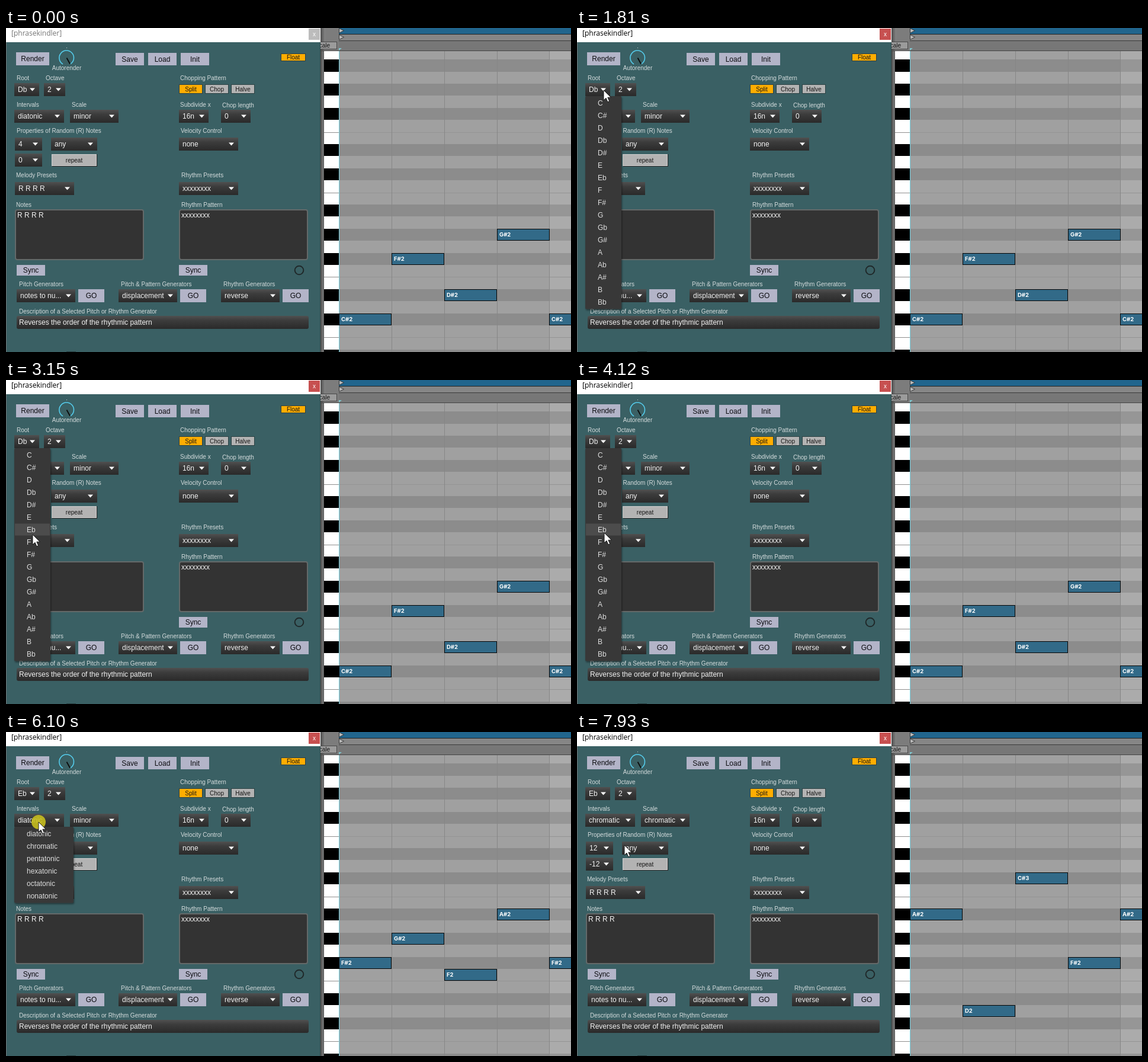
Recreate the animation shown at these times as an HTML page. Size 954 by 547 pixels, loop 8 s.

```html
<!DOCTYPE html>
<html lang="en">
<head>
<meta charset="utf-8">
<title>Melody tool</title>
<style>
  html, body { margin: 0; width: 100%; height: 100%; overflow: hidden; background: #3a6064; }
  svg { display: block; width: 954px; height: 547px; }
  text { font: 12px "Liberation Sans", Arial, sans-serif; fill: #f2f2f2; }
  .label { font-size: 10px; fill: #d5dcdd; }
  .dark { fill: #0c0c10; }
  .small { font-size: 10px; fill: #141414; }
  .note { font: 700 9.5px Inter, "Liberation Sans", sans-serif; fill: #fff; }
  .title { font: 12px "Open Sans", "Noto Sans", sans-serif; }
  .item { fill: #dedede; }
</style>
</head>
<body>
<svg id="stage" viewBox="0 0 954 547" xmlns="http://www.w3.org/2000/svg">
  <defs>
    <linearGradient id="drop" x2="0" y2="1">
      <stop offset="0" stop-color="#505050"/><stop offset=".35" stop-color="#3c3c3c"/><stop offset="1" stop-color="#2a2a2a"/>
    </linearGradient>
    <linearGradient id="edge">
      <stop offset="0" stop-color="#4c4c4c"/><stop offset="1" stop-color="#858585"/>
    </linearGradient>
    <filter id="shade" x="-10%" y="-5%" width="125%" height="115%">
      <feDropShadow dx="1" dy="2" stdDeviation="1.5" flood-opacity=".45"/>
    </filter>
  </defs>
</svg>
<script>
const LOOP = 8000;
const stage = document.getElementById("stage");

function add(tag, attrs, parent = stage) {
  const el = document.createElementNS("http://www.w3.org/2000/svg", tag);
  for (const k in attrs) el.setAttribute(k, attrs[k]);
  return parent.appendChild(el);
}
const box = (x, y, w, h, fill, parent, more) =>
  add("rect", { x, y, width: w, height: h, fill, ...more }, parent);
function write(x, y, str, cls = "", parent, anchor = "start") {
  const el = add("text", { x, y, class: cls, "text-anchor": anchor }, parent);
  el.textContent = str;
  return el;
}
const show = (el, on) => el.setAttribute("visibility", on ? "visible" : "hidden");
function setText(el, str) { if (el.textContent !== str) el.textContent = str; }

// ---- piano roll ----
const NAMES = ["C", "C#", "D", "D#", "E", "F", "F#", "G", "G#", "A", "A#", "B"];
const BEATS = [562, 651, 740, 829, 917];
const rowTop = p => Math.round(481.6 - 20.4 * (p - 1));
const mod12 = p => (p + 12) % 12;

box(531, 0, 423, 547, "#858585");
for (let p = -2; p <= 23; p++) {
  const y = rowTop(p), h = rowTop(p - 1) - y, name = NAMES[mod12(p)], black = name.length > 1;
  box(562, y, 355, h, black ? "#8c8c8c" : "#a0a0a0");
  box(917, y, 37, h, black ? "#969696" : "#ababab");
  box(537, y, 25, h, black ? "#000" : "#fff");
  if (name === "E" || name === "B") {
    box(537, y, 25, 1, "#8f8f8f");
    box(562, y, 392, 1, "#949494");
  }
}
BEATS.slice(1).forEach(x => box(x, 39, 1, 508, "#868686"));
box(531, 39, 6, 508, "url(#edge)");
box(536, 39, 1, 508, "#555");
box(531, 0, 31, 39, "#7c7c7c");
box(531, 0, 8, 39, "url(#edge)");
box(562, 0, 392, 10, "#21658d");
box(562, 10, 392, 1, "#222");
box(562, 11, 392, 10, "#868686");
box(562, 21, 392, 1, "#3a3a3a");
box(562, 22, 392, 16, "#777");
box(531, 38, 423, 1, "#444");
box(520.5, 23.5, 38, 12, "#9b9b9b", stage, { stroke: "#484848" });
write(522, 33, "Scale", "small");
for (const y of [0, 11])
  add("path", { d: `M562.5 ${y + .5}L570.5 ${y + 4.5}L562.5 ${y + 8.5}Z`, fill: "#b9b9b9", stroke: "#222", "stroke-width": .8 });
add("path", { d: "M562 34h5l-5 4z", fill: "#7fc9d2" });
box(562, 39, 1, 508, "#76d3e4");

const tunes = [[1, 6, 3, 8, 1], [6, 8, 5, 10, 6], [10, 2, 13, 6, 10]].map(tune => {
  const g = add("g", {});
  tune.forEach((p, i) => {
    const x = BEATS[i], y = rowTop(p);
    box(x + .5, y + .5, 88, 19, "#326a88", g, { stroke: "#050505" });
    write(x + 4, y + 13.3, NAMES[p % 12] + (p < 12 ? 2 : 3), "note", g);
  });
  return g;
});

// ---- window ----
box(0, 0, 531, 547, "#3a6064");
box(0, 24, 1, 523, "#6c7577");
box(530, 24, 1, 523, "#2e4a4d");
box(0, 0, 531, 24, "#fff");
box(102, 546, 16, 1, "#263c3e");
const title = write(9, 13, "[phrasekindler]", "title");
const closeBox = box(511, 1, 19, 19, "#bcbcbc");
write(520.5, 14, "x", "label", stage, "middle").style.fill = "#fff";

function button(x, y, w, h, str) {
  box(x, y, w, h, "#b3b4c8");
  write(x + w / 2, y + h / 2 + 4.4, str, "dark", stage, "middle");
}
button(17, 41, 56, 22, "Render");
[["Save", 185], ["Load", 240], ["Init", 295]].forEach(([s, x]) => button(x, 42, 48, 21, s));
[18, 292].forEach(x => button(x, 400, 48, 18, "Sync"));
[122, 294, 467].forEach(x => button(x, 441, 44, 22, "GO"));

function toggle(x, y, w, h, str, fill) {
  box(x + .5, y + .5, w - 1, h - 1, fill, stage, { stroke: "#2d4143" });
  write(x + w / 2, y + h / 2 + 3.5, str, "small", stage, "middle");
}
toggle(464, 43, 42, 13, "Float", "#ffad00");
toggle(292, 95, 40, 16, "Split", "#ffad00");
toggle(336, 95, 40, 16, "Chop", "#b3b3b3");
toggle(380, 95, 40, 16, "Halve", "#b3b3b3");
box(78, 213, 76, 21, "#222");
box(77.5, 213.5, 75, 19, "#b3b3b3", stage, { stroke: "#d0d0d0" });
write(115, 226.5, "repeat", "small", stage, "middle");

// dial
add("path", { d: "M96 61A12.3 12.3 0 1 1 109 60.6", fill: "none", stroke: "#55cdec", "stroke-width": 1.6 });
add("path", { d: "M102.5 50.5L108 60.5", stroke: "#0c0c0c", "stroke-width": 1.8 });
box(102, 33, 1, 1, "#cfd8d9");
write(102.5, 71, "Autorender", "label", stage, "middle");

[[18, 88, "Root"], [67, 88, "Octave"], [294, 88, "Chopping Pattern"],
 [18, 133, "Intervals"], [111, 133, "Scale"], [294, 133, "Subdivide x"], [365, 134, "Chop length"],
 [18, 177, "Properties of Random (R) Notes"], [295, 177, "Velocity Control"],
 [17, 252, "Melody Presets"], [296, 252, "Rhythm Presets"],
 [17, 302, "Notes"], [296, 302, "Rhythm Pattern"],
 [22, 436, "Pitch Generators"], [194, 436, "Pitch & Pattern Generators"], [367, 436, "Rhythm Generators"],
 [22, 482, "Description of a Selected Pitch or Rhythm Generator"]
].forEach(([x, y, s]) => write(x, y, s, "label"));

function select(x, y, w, str) {
  box(x, y, w, 22, "url(#drop)");
  const ax = x + w - 11.5;
  add("path", { d: `M${ax - 4.5} ${y + 8.5}h9l-4.5 5z`, fill: "#fff" });
  return write(x + 6, y + 15, str);
}
const root = select(14, 93, 42, "Db");
select(64, 93, 36, "2");
const intervals = select(14, 138, 84, "diatonic");
const scale = select(108, 138, 82, "minor");
select(292, 138, 50, "16n");
select(363, 138, 50, "0");
const high = select(15, 185, 46, "4");
select(76, 185, 78, "any");
const low = select(15, 212, 46, "0");
select(292, 185, 100, "none");
select(15, 260, 100, "R R R R");
select(292, 260, 100, "xxxxxxxx");
select(18, 441, 99, "notes to nu...");
select(190, 441, 99, "displacement");
select(363, 441, 99, "reverse");

[[16, "R R R R"], [293, "xxxxxxxx"]].forEach(([x, s]) => {
  box(x, 307, 216, 84, "#333", stage, { rx: 3, stroke: "#646969", "stroke-width": 2 });
  write(x + 3, 320, s);
});
add("circle", { cx: 495, cy: 409, r: 7.3, fill: "none", stroke: "#20292a", "stroke-width": 2 });
box(18, 486, 493, 22, "url(#drop)", stage, { rx: 3 });
write(22, 501, "Reverses the order of the rhythmic pattern");

// ---- pop-up menus ----
function makeMenu(y, w, items) {
  const g = add("g", {});
  box(14, y, w, items.length * 21 + 2.5, "#373737", g, { rx: 2, filter: "url(#shade)" });
  const bar = box(15, y, w - 2, 20, "#4c4c4c", g);
  items.forEach((s, i) => write(35, y + 16 + 21 * i, s, "item", g));
  return (open, py) => {
    const i = Math.floor((py - y - 1) / 21);
    show(g, open);
    show(bar, open && i >= 0 && i < items.length);
    bar.setAttribute("y", y + 1.5 + 21 * i);
  };
}
const rootMenu = makeMenu(115, 61, "C C# D Db D# E Eb F F# G Gb G# A Ab A# B Bb".split(" "));
const intervalMenu = makeMenu(160, 100, ["diatonic", "chromatic", "pentatonic", "hexatonic", "octatonic", "nonatonic"]);

// ---- pointer ----
const halo = add("circle", { r: 12, fill: "#c9c01e", "fill-opacity": .88 });
const pointer = add("path", {
  d: "M0 0V17L4 13.2L6.8 19.8L9.6 18.6L6.8 12.2H12.3Z", fill: "#fff", stroke: "#111", "stroke-width": .9
});

// time, x, y
const PATH = [
  [0, 800, 562], [70, 772, 541], [400, 555, 430], [800, 220, 237], [950, 140, 174], [1250, 45, 105],
  [1880, 45, 105], [2500, 46, 185], [3150, 45, 261], [3500, 46, 258], [4500, 46, 258],
  [4900, 53, 202], [5400, 55, 158], [5750, 55, 152], [6500, 55, 152],
  [7230, 67, 195], [7640, 68, 195], [7930, 80, 191], [8000, 82, 190]
];
const CLICKS = [[1330, 1700], [4190, 4480], [5890, 6320], [7370, 7640]];
const within = (t, a, b) => t >= a && t < b;

function place(t) {
  const i = Math.max(1, PATH.findIndex(k => k[0] > t));
  const [t0, x0, y0] = PATH[i - 1], [t1, x1, y1] = PATH[i];
  const u = (t - t0) / (t1 - t0);
  return [x0 + (x1 - x0) * u, y0 + (y1 - y0) * u];
}

function draw(t) {
  const [x, y] = place(t);
  pointer.setAttribute("transform", `translate(${x.toFixed(1)} ${y.toFixed(1)})`);
  halo.setAttribute("cx", x);
  halo.setAttribute("cy", y);
  show(halo, CLICKS.some(([a, b]) => within(t, a, b)));

  const active = t >= 1330;
  title.style.fill = active ? "#000" : "#777";
  closeBox.setAttribute("fill", active ? "#c75050" : "#bcbcbc");

  rootMenu(within(t, 1400, 4330), y);
  intervalMenu(within(t, 5960, 7440), y);

  const tune = t < 4400 ? 0 : t < 7500 ? 1 : 2;
  tunes.forEach((g, i) => show(g, i === tune));
  const chromatic = t >= 7440;
  setText(root, t < 4330 ? "Db" : "Eb");
  setText(intervals, chromatic ? "chromatic" : "diatonic");
  setText(scale, chromatic ? "chromatic" : "minor");
  setText(high, chromatic ? "12" : "4");
  setText(low, chromatic ? "-12" : "0");
}

function tick() {
  draw(performance.now() % LOOP);
  requestAnimationFrame(tick);
}
tick();
</script>
</body>
</html>
```
